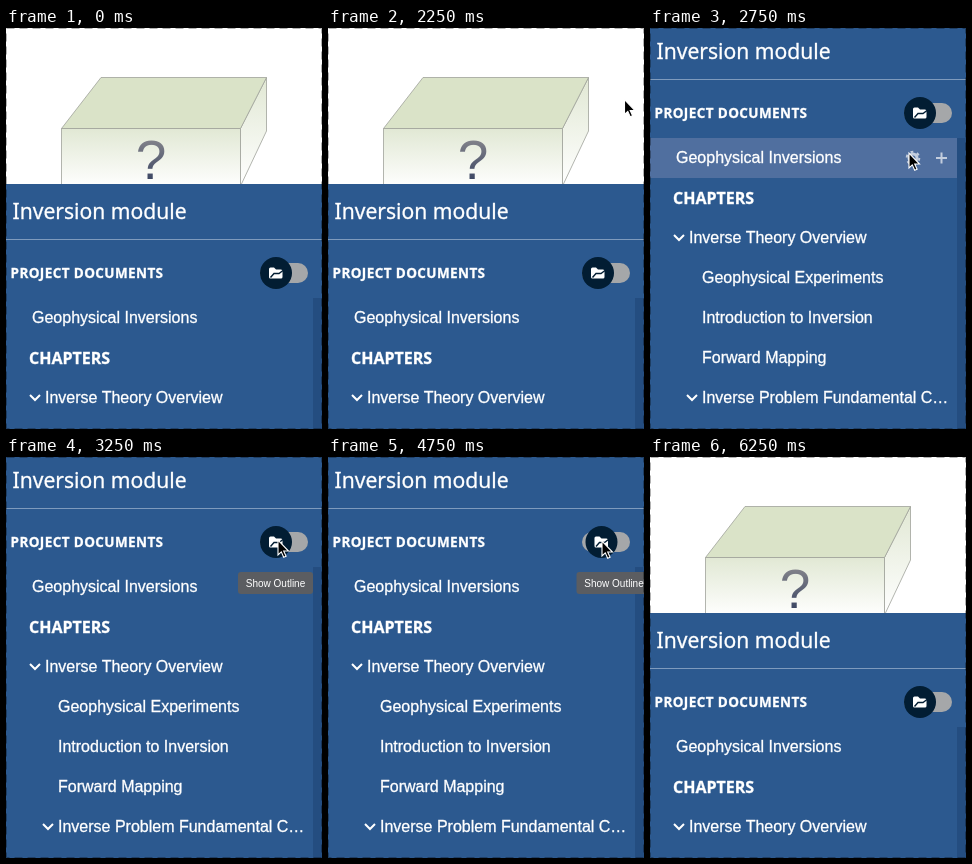
Recreate the animation shown at these times as an HTML page. Size 316 px wide and 401 px high, loop 7.5 s.

```html
<!DOCTYPE html>
<html lang="en">
<head>
<meta charset="utf-8">
<title>Inversion module</title>
<style>
  html, body { margin: 0; width: 100%; height: 100%; overflow: hidden; background: #fff; }
  svg { display: block; width: 316px; height: 401px; }
  text { fill: #fff; white-space: pre; }
  .noto { font-family: "Noto Sans", "Open Sans", sans-serif; }
  .sans { font-family: "Liberation Sans", Arial, sans-serif; }
  #panel text { stroke: #fff; stroke-width: .3; }
  .line { fill: none; stroke: #fff; stroke-width: 2; }
</style>
</head>
<body>
<svg viewBox="0 0 316 401">
  <defs>
    <linearGradient id="face" x2="0" y2="1">
      <stop stop-color="#e1e8d4"/><stop offset="1" stop-color="#fff"/>
    </linearGradient>
    <linearGradient id="ink" gradientUnits="userSpaceOnUse" x1="0" y1="110" x2="0" y2="152">
      <stop stop-color="#85858c"/><stop offset="1" stop-color="#3c4663"/>
    </linearGradient>
  </defs>

  <g stroke="#a0a39b" stroke-width=".8" stroke-linejoin="round">
    <path d="M234.5 100.5 260.5 49.5V103L234.5 158z" fill="url(#face)"/>
    <path d="M55.500 100.500H234.500V160H55.500z" fill="url(#face)"/>
    <path d="M95 49.500H260.500L234.500 100.500H55.500z" fill="#dae3c8"/>
  </g>
  <text class="sans" x="145" y="150.500" font-size="55" text-anchor="middle" style="fill:url(#ink)">?</text>

  <g id="panel">
    <rect width="316" height="420" fill="#2c598f"/>
    <text class="noto" x="6.500" y="35" font-size="21.100">Inversion module</text>
    <path d="M0 55.500H316" stroke="#7f9bbd"/>
    <text id="label" class="noto" x="4.500" y="94" font-size="13.500" font-weight="bold" letter-spacing=".4"></text>
    <rect x="254" y="79" width="48" height="20" rx="10" fill="#a5a7a9"/>
    <g id="knob">
      <circle r="16" fill="#021d33"/>
      <path d="M-7 4V-4q0-1.500 1.500-1.500h3.500l2 2h5q1.500 0 1.500 1.500V4q0 1.500-1.500 1.500h-10.500q-1.500 0-1.500-1.500z" fill="#fff"/>
      <path d="M-5.500 4.500-2 .5H3L7-2.500" fill="none" stroke="#021d33" stroke-width="1.400"/>
    </g>
    <g id="list" class="sans" font-size="16">
      <rect x="307" y="114" width="9" height="306" fill="#244d80"/>
      <rect id="hover" width="307" height="40" fill="#506f9f"/>
      <g id="tools" fill="none" stroke="#c3cddd" stroke-width="2">
        <circle cx="263" cy="134" r="4" stroke-width="3"/>
        <circle cx="263" cy="134" r="6.300" stroke-dasharray="2.800 3.798"/>
        <path d="M286 134h11m-5.500-5.500v11"/>
      </g>
    </g>
  </g>

  <g id="tip">
    <rect id="tipBox" y="115" height="22" rx="3" fill="#5b5d61"/>
    <text id="tipText" class="sans" y="130" font-size="10" text-anchor="middle"></text>
  </g>
  <rect x=".5" y=".5" width="315" height="400" fill="none" stroke="#000" stroke-opacity=".3" stroke-dasharray="8 5"/>
  <path id="cursor" d="M0 0v15l3.300-3.100 2.400 5.400 2.400-1-2.400-5.300h4.800z" fill="#000" stroke="#fff" stroke-width="1.100"/>
</svg>
<script>
const LOOP = 7500, STEP = 250, ROW = 40, LIST_TOP = 114;
const $ = id => document.getElementById(id);
const show = (id, on) => $(id).style.display = on ? '' : 'none';
const move = (id, x, y) => $(id).setAttribute('transform', `translate(${x} ${y})`);
const set = (id, attrs) => Object.entries(attrs).forEach(([k, v]) => $(id).setAttribute(k, v));
const progress = (t, from, span) => Math.min(1, Math.max(0, (t - from) / span));
const easeIn = (p, power) => p ** power;
const easeOut = (p, power) => 1 - (1 - p) ** power;
const within = (t, from, to) => t >= from && t < to;

// Menu rows: each level indents by 13px, "v" marks an open branch.
const rows = [
  ['Geophysical Inversions', 0], ['CHAPTERS', 0, 'title'], ['Inverse Theory Overview', 1, 'v'],
  ['Geophysical Experiments', 2], ['Introduction to Inversion', 2], ['Forward Mapping', 2],
  ['Inverse Problem Fundamental C…', 2, 'v']
];
$('list').innerHTML += rows.map(([text, level, kind], i) => {
  const x = 26 + level * 13, y = LIST_TOP + i * ROW + 25;
  if (kind === 'title') return `<text class="noto" font-weight="bold" x="${x - 3}" y="${y + 1}">${text}</text>`;
  const arrow = kind ? `<path class="line" d="M${x - 15} ${y - 8}l5 5 5-5"/>` : '';
  return `${arrow}<text x="${x}" y="${y}">${text}</text>`;
}).join('');

// Pointer route: [ms, x, y], straight between stops.
const route = [
  [500, 180, 270], [750, 178, 242], [1000, 217, 240], [1500, 285, 167],
  [1750, 301, 123], [2000, 300, 1], [2500, 293, 142], [3000, 225, 108],
  [3250, 272, 83], [4750, 274, 84], [5250, 299, 1], [5750, 292, 24]
];
function pointerAt(t) {
  const i = route.findLastIndex(stop => stop[0] <= t);
  const [t0, x0, y0] = route[Math.max(i, 0)];
  const [t1, x1, y1] = route[i + 1] || [LOOP, x0, y0];
  const p = progress(t, t0, t1 - t0);
  return [x0 + (x1 - x0) * p, y0 + (y1 - y0) * p];
}

function draw(t) {
  const [x, y] = pointerAt(t);
  show('cursor', within(t, 500, 6250));
  move('cursor', x, y);

  const lift = easeOut(progress(t, 2250, 500), 3.6) - easeIn(progress(t, 5500, 500), 6.3);
  const top = Math.round(156 - 160 * lift);
  move('panel', 0, top);

  const slide = easeOut(progress(t, 3250, 500), 2.2) - easeOut(progress(t, 4500, 500), 2.2);
  move('knob', 270 + 16 * slide, 89);

  const outline = within(t, 3500, 4750);
  $('label').textContent = outline ? 'OUTLINE' : 'PROJECT DOCUMENTS';
  show('list', !outline);

  const row = Math.floor((y - top - LIST_TOP) / ROW);
  const hovered = row >= 0 && within(t, 2500, 6000);
  show('hover', hovered);
  show('tools', hovered && row === 0);
  if (hovered) set('hover', { y: LIST_TOP + row * ROW });

  const text = outline ? 'Show Documents' : 'Show Outline';
  const mid = t < 3500 ? 269.5 : 286, width = text.length * 6.25;
  show('tip', within(t, 3250, 5000));
  $('tipText').textContent = text;
  set('tipText', { x: mid });
  set('tipBox', { x: mid - width / 2, width });
}

const start = performance.now();
function tick() {
  const t = (performance.now() - start) % LOOP;
  draw(Math.floor(t / STEP) * STEP);
  requestAnimationFrame(tick);
}
tick();
</script>
</body>
</html>
```
